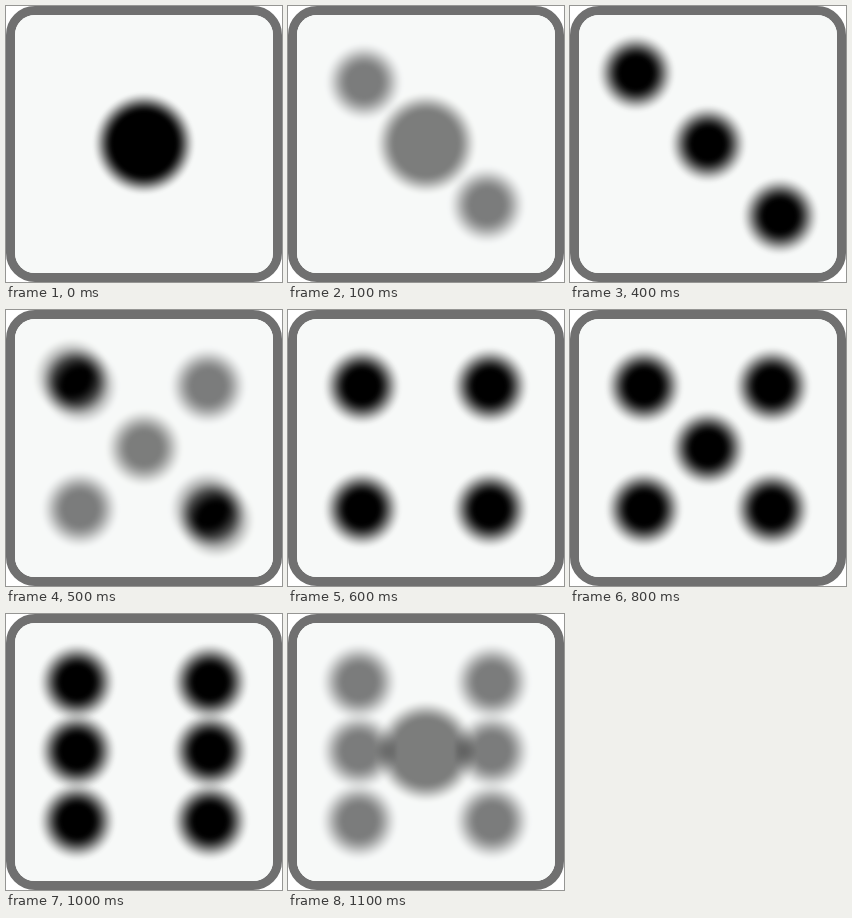
An HTML page for the animation above (1200 ms loop, 276 by 276 pixels).

```html
<!DOCTYPE html>
<html lang="en">
<head>
<meta charset="utf-8">
<title>Die</title>
<style>
  html, body { margin: 0; width: 100%; height: 100%; overflow: hidden; background: #fff; }
  #die {
    position: relative; box-sizing: border-box; width: 276px; height: 276px;
    border: 9px solid #707070; border-radius: 29px; background: #f7f9f8; overflow: hidden;
  }
  .face { position: absolute; left: -9px; top: -9px; width: 276px; height: 276px; }
</style>
</head>
<body>
<div id="die"></div>
<script>
const STEP = 100;
const SMALL = [14, 41], BIG = [30, 53]; // solid core and outer fade radius
const corners = [[74, 76], [202, 76], [74, 199], [202, 199]];
const middle = [138, 138];
const faces = [
  [[138, 137.5]],
  [[76, 76], [199, 199]],
  [[66, 67], middle, [210, 210]],
  corners,
  [...corners, middle],
  [68, 137, 207].flatMap(y => [[71, y], [204, y]])
];

// A soft black disc with a smoothstep edge
function pip([x, y], [core, edge]) {
  const stops = [];
  for (let i = 0; i <= 12; i++) {
    const t = i / 12, alpha = 1 - t * t * (3 - 2 * t);
    stops.push(`rgba(0,0,0,${alpha.toFixed(3)}) ${core + (edge - core) * t}px`);
  }
  return `radial-gradient(circle at ${x}px ${y}px, ${stops})`;
}

const layers = faces.map((pips, i) => {
  const layer = document.createElement('div');
  layer.className = 'face';
  layer.style.background = pips.map(p => pip(p, i ? SMALL : BIG)) + ', #f7f9f8';
  document.getElementById('die').append(layer);
  return layer;
});

// Each face holds for one step, then shares one step evenly with the next
function draw(now) {
  const step = Math.floor(now / STEP) % 12;
  const a = step >> 1;
  const b = step % 2 ? (a + 1) % 6 : a;
  const low = Math.min(a, b), high = Math.max(a, b);
  layers.forEach((layer, i) => {
    layer.style.opacity = i === low ? 1 : i === high ? 0.5 : 0;
  });
}

const start = performance.now();
function tick() {
  draw(performance.now() - start);
  requestAnimationFrame(tick);
}
tick();
</script>
</body>
</html>
```
